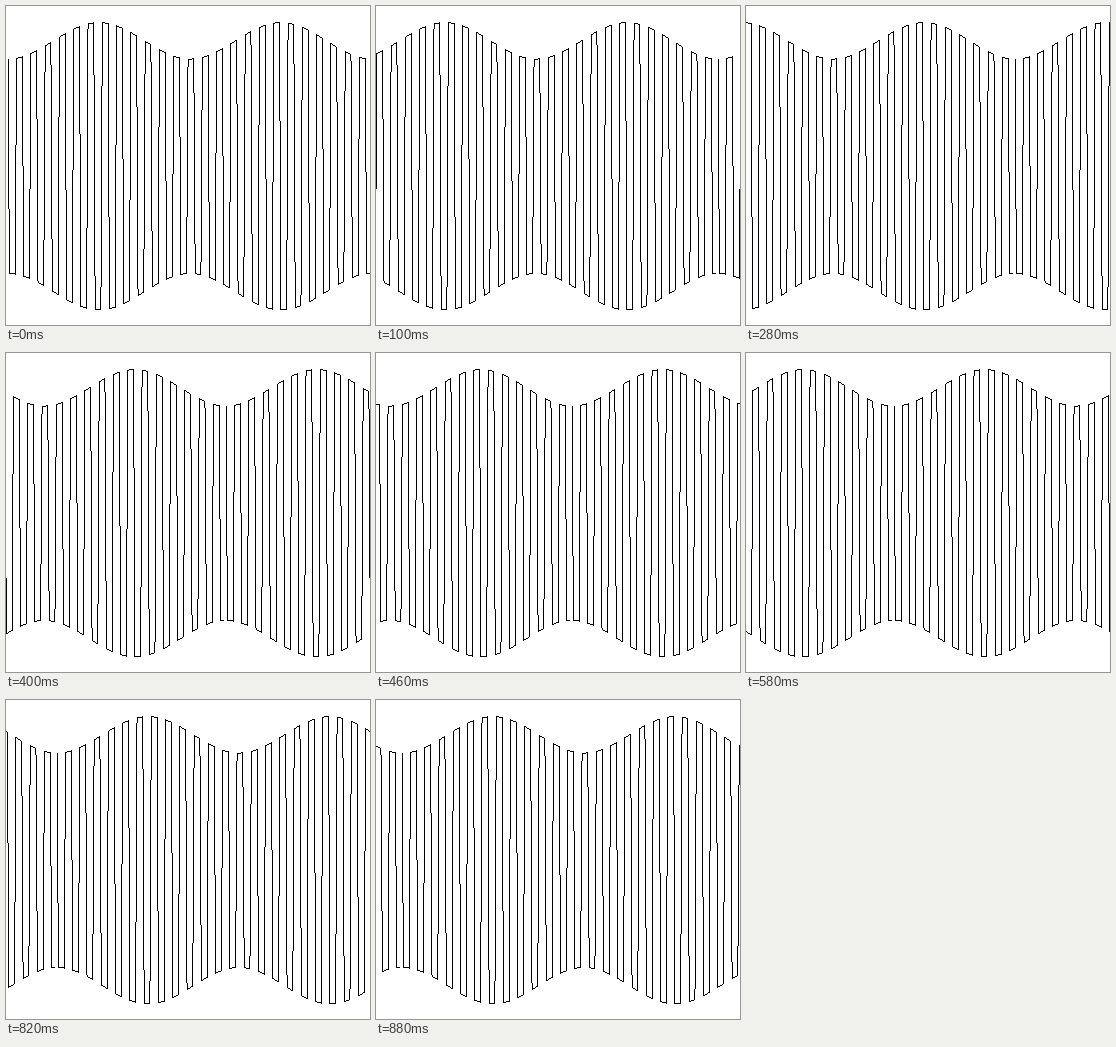
An HTML page with a canvas for the animation above (0.94 s loop, 364 by 319 pixels).

```html
<!DOCTYPE html>
<html lang="en">
<head>
<meta charset="utf-8">
<title>Modulated square wave</title>
<style>
  html, body { margin: 0; width: 100%; height: 100%; overflow: hidden; background: #fff; }
  canvas { display: block; width: 364px; height: 319px; image-rendering: pixelated; }
</style>
</head>
<body>
<canvas id="stage" width="364" height="319"></canvas>
<script>
const W = 364, H = 319;
const STEPS = 15, FIRST = 100, STEP = 60;
const LOOP = FIRST + (STEPS - 1) * STEP;
const X0 = 1.5, DX = 1.429;

const ctx = document.getElementById('stage').getContext('2d');
const strip = document.createElement('canvas');
strip.width = W;
strip.height = H;
const pen = strip.getContext('2d');

// One-pixel line without smoothing
function line(a, b) {
  const dx = b.x - a.x, dy = b.y - a.y;
  const steep = Math.abs(dy) > Math.abs(dx);
  const from = Math.round(steep ? a.y : a.x);
  const to = Math.round(steep ? b.y : b.x);
  const dir = from < to ? 1 : -1;
  for (let i = from; ; i += dir) {
    const x = steep ? Math.round(a.x + (i - a.y) * dx / dy) : i;
    const y = steep ? i : Math.round(a.y + (i - a.x) * dy / dx);
    pen.fillRect(x, y, 1, 1);
    if (i === to) break;
  }
}

// Square carrier, 10 samples per cycle; the envelope has two cycles per width
function sample(j) {
  const x = X0 + DX * j;
  const sign = (j + 9) % 10 < 5 ? 1 : -1;
  const amp = 125.4 - 18.2 * Math.cos(4 * Math.PI * (x - X0) / W);
  return { x, y: 159.75 + sign * amp };
}

function drawStrip() {
  pen.fillStyle = '#fff';
  pen.fillRect(0, 0, W, H);
  pen.fillStyle = '#000';
  for (let j = 0; j < 253; j++) line(sample(j), sample(j + 1));
}

function render(ms) {
  const t = ms % LOOP;
  const step = t < FIRST ? 0 : 1 + Math.floor((t - FIRST) / STEP);
  const shift = Math.round(step * W / STEPS);
  ctx.drawImage(strip, -shift, 0);
  ctx.drawImage(strip, W - shift, 0);
}

drawStrip();
render(0);
let start;
function tick(now) {
  if (start === undefined) start = now;
  render(now - start);
  requestAnimationFrame(tick);
}
requestAnimationFrame(tick);
</script>
</body>
</html>
```
